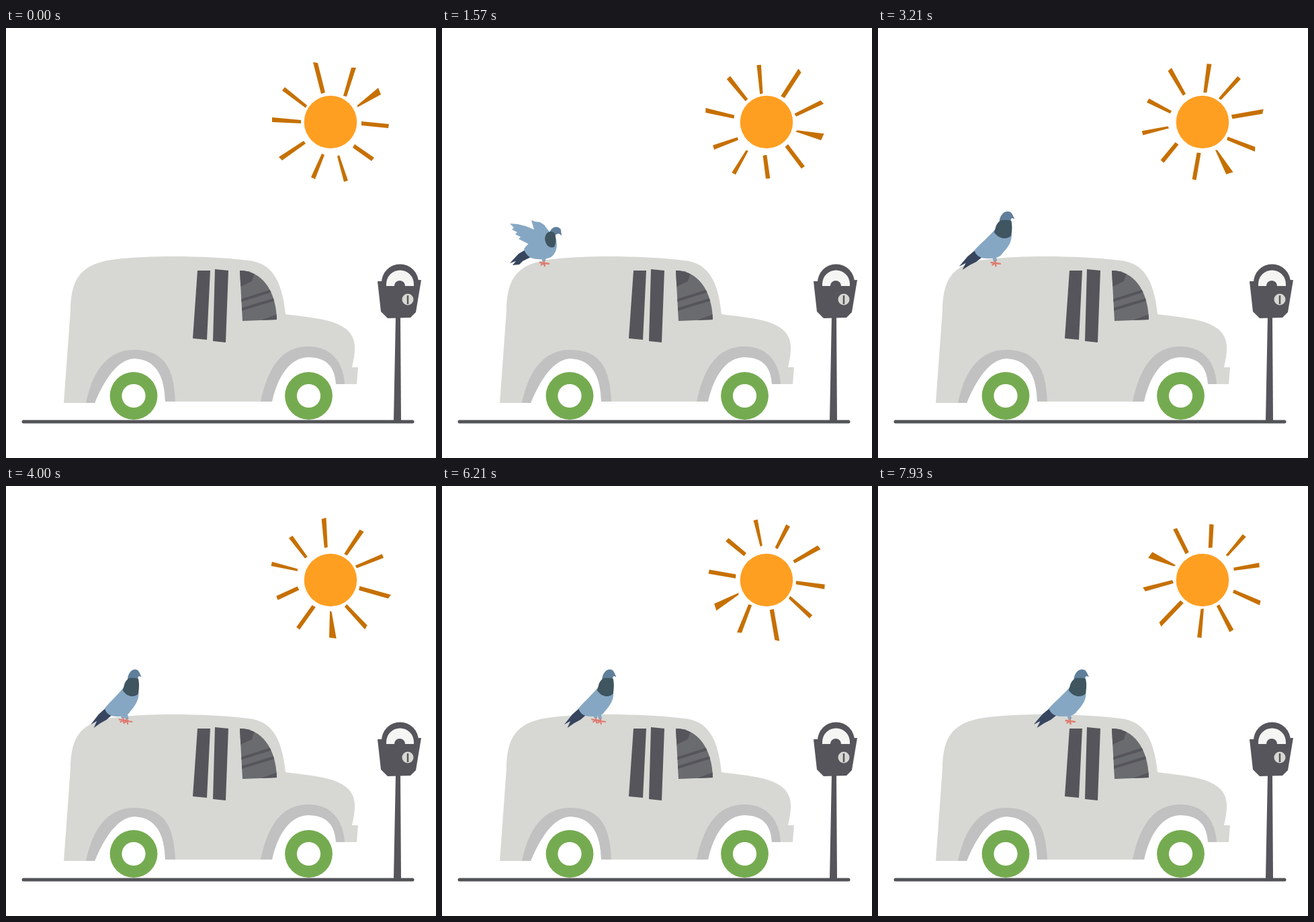
Write an HTML page with a canvas that moves like this. It is 640x640 px and loops after 8000 ms.

```html
<!DOCTYPE html>
<html lang="en">
<head>
<meta charset="utf-8">
<title>Pigeon on a van</title>
<style>
html, body { margin: 0; width: 100%; height: 100%; overflow: hidden; background: #fff; }
canvas { display: block; width: 640px; height: 640px; }
</style>
</head>
<body>
<canvas id="stage" width="640" height="640"></canvas>
<script>
const ctx = document.getElementById('stage').getContext('2d');
const LOOP = 8000, FRAMES = 112, TAU = Math.PI * 2;
const DARK = '#55555b', BLUE = '#86a7c3', PINK = '#de7b70', WHITE = '#fff';

const clamp = v => Math.min(1, Math.max(0, v));
const ease = v => (1 - Math.cos(Math.PI * clamp(v))) / 2;

function fill(color, path) {
  ctx.fillStyle = color;
  ctx.fill(typeof path === 'string' ? new Path2D(path) : path);
}
function disc(color, x, y, r) {
  ctx.fillStyle = color;
  ctx.beginPath();
  ctx.arc(x, y, r, 0, TAU);
  ctx.fill();
}
function line(color, width, path, cap = 'butt') {
  ctx.strokeStyle = color;
  ctx.lineWidth = width;
  ctx.lineCap = cap;
  ctx.stroke(new Path2D(path));
}
// Blends two paths that share the same commands.
function mix(a, b, u) {
  const to = b.match(/[\d.]+/g);
  let i = 0;
  return a.replace(/[\d.]+/g, n => +n + (to[i++] - n) * u);
}

const rays = new Path2D(
  'M457,51L464,52L475,96L469,98Z M514,59L521,59L507,102L502,101Z ' +
  'M554,89L558,99L523,118L523,115Z M570,143L569,149L529,145L529,139Z ' +
  'M548,193L544,198L516,178L519,173Z M509,227L503,229L493,191L496,189Z ' +
  'M460,225L454,222L470,187L474,189Z M411,197L406,192L443,168L446,172Z ' +
  'M396,133L396,140L439,142L439,137Z M411,93L415,88L448,115L446,119Z');

function drawSun(t) {
  ctx.save();
  ctx.translate(483, 140);
  ctx.rotate(t / 12000 * TAU);
  ctx.translate(-483, -140);
  fill('#c67000', rays);
  ctx.restore();
  disc('#ff9f22', 483, 140, 39.3);
}

function drawVan() {
  fill('#d7d8d3',
    'M86,558L96,420C97,378 107,350 165,344C220,338 300,339 360,346C395,349 411,375 416,426' +
    'C455,431 475,433 492,440C516,450 522,465 518,490L515,505L524,505L522,530H491' +
    'C490,508 480,490 450,490C425,490 405,515 396,556H237' +
    'C236,520 225,494 192,492C170,492 150,515 132,558Z');
  fill('#c1c1c2',
    'M119,558C130,505 155,479 190,479C235,479 250,505 252,556H237C236,520 225,494 192,492C170,492 150,515 132,558Z');
  fill('#c1c1c2',
    'M379,556C390,505 410,474 450,474C490,474 503,505 504,530H491C490,508 480,490 450,490C425,490 405,515 396,556Z');
  fill(DARK, 'M285,361H304L299,464L278,462Z M311,359L331,361L327,468L308,466Z');

  const glass = new Path2D('M348,361C380,361 402,390 403,434L352,436Z');
  fill('#6a6b6f', glass);
  ctx.save();
  ctx.clip(glass);
  fill(DARK, 'M346,359H372L366,377L349,385Z M374,437L404,426V437Z');
  line(DARK, 4, 'M348,406L402,389M350,419L406,402');
  ctx.restore();

  for (const x of [190, 450.5]) {
    disc('#75ab50', x, 547.5, 35.4);
    disc(WHITE, x, 547.5, 17.6);
  }
}

function drawMeter() {
  fill(DARK, 'M580,430H587L588,584H577Z');
  fill(DARK, 'M553,377L618,375L610,423L602,431L568,432L558,422Z');
  fill(DARK, 'M559,384V379A27.5,27.5 0 0 1 614,379V384Z');
  fill('#f5f6f4', 'M566,384V381A20.5,20.5 0 0 1 607,381V384Z');
  disc(DARK, 586, 384, 8);
  disc('#d7d8d3', 598, 404, 8.5);
  line(DARK, 2.5, 'M598,398V411');
}

// Each part: colour, landing outline, standing outline.
const parts = [
  ['#37455f',
    'M152,329L140,336L127,350L136,347L131,353L141,352L146,347L158,341Z',
    'M148,331L137,340L124,355L134,350L129,360L140,353L150,348L159,341Z'],
  [BLUE,
    'M176,306C165,312 154,320 148,329C152,342 162,344 170,344C180,345 190,342 193,336C199,328 198,312 190,304Z',
    'M180,298C170,310 155,322 147,331C150,340 158,343 166,343C178,343 186,342 190,335C200,325 205,315 203,306Z'],
  ['#5f7f9b',
    'M186,306C187,299 192,296 197,296C201,297 203,299 203,301L204,309L200,306C199,306 196,307 193,309Z',
    'M185,288C186,279 191,273 198,273C202,273 204,276 205,278L208,284L204,283C202,284 202,286 203,289Z'],
  ['#3f5560',
    'M184,304C187,302 192,303 194,306C196,313 196,320 193,326C187,328 182,325 180,318C178,312 180,307 184,304Z',
    'M186,287C190,285 200,286 203,287C205,295 204,303 203,309C197,315 185,315 177,304C180,299 178,293 186,287Z']
];
const wings = new Path2D(
  'M127,291L139,292L151,295L163,300L159,286L164,288L172,289L178,293L188,306L181,320L164,326' +
  'L150,319L140,314L143,311L135,307L138,304L130,300L133,297Z');

function drawLeg(dx, dy) {
  ctx.save();
  ctx.translate(dx, dy);
  line(BLUE, 5, 'M176,340L178,347');
  line(PINK, 2, 'M178,346V350M171,349L178,350L186,351M178,350L179,355M178,350L173,353');
  ctx.restore();
}

function drawBird(t) {
  if (t < 60) return;
  const stand = ease((t - 1610) / 260);
  const far = (1 - clamp(t / 1150)) ** 1.4;

  const walk = Math.max(0, t - 2430);
  const step = Math.floor(walk / 1200);
  const local = walk - step * 1200 - 600;
  const travel = 28 * (step + ease(local / 530 + 0.5));
  const phase = (t - 3030) / 1200 * TAU;
  const reach = (80 + 5 * Math.cos(phase - 310 / 1200 * TAU)) / 84;
  const apart = stand * Math.max(0, Math.cos(phase - 820 / 1200 * TAU));

  ctx.save();
  ctx.translate(travel - 26 - 90 * far, -90 * far);
  drawLeg(-8 * apart, -2 * apart);
  drawLeg(0, 0);

  ctx.translate(123, 0);
  ctx.scale(1 + (reach - 1) * stand, 1);
  ctx.translate(-123, 0);
  const [tail, body, head, neck] = parts.map(p => [p[0], mix(p[1], p[2], stand)]);
  fill(...tail);
  fill(...body);
  if (stand < 1) {
    const size = 1 - stand;
    const flap = 0.2 + 0.8 * Math.cos((t - 1570) / 290 * TAU);
    ctx.save();
    ctx.translate(176, 318);
    ctx.scale(size, size * flap);
    ctx.translate(-176, -318);
    fill(BLUE, wings);
    ctx.restore();
  }
  fill(...head);
  fill(...neck);
  ctx.restore();
}

function draw(now) {
  // 14 drawings a second, each starting on a 10 ms mark
  const frame = Math.floor((now % LOOP + 2) / LOOP * FRAMES) % FRAMES;
  const t = frame * LOOP / FRAMES;
  ctx.fillStyle = WHITE;
  ctx.fillRect(0, 0, 640, 640);
  drawSun(t);
  line('#525357', 5, 'M26,586H605', 'round');
  drawVan();
  drawMeter();
  drawBird(t);
}

function tick() {
  draw(performance.now());
  requestAnimationFrame(tick);
}
tick();
</script>
</body>
</html>
```
